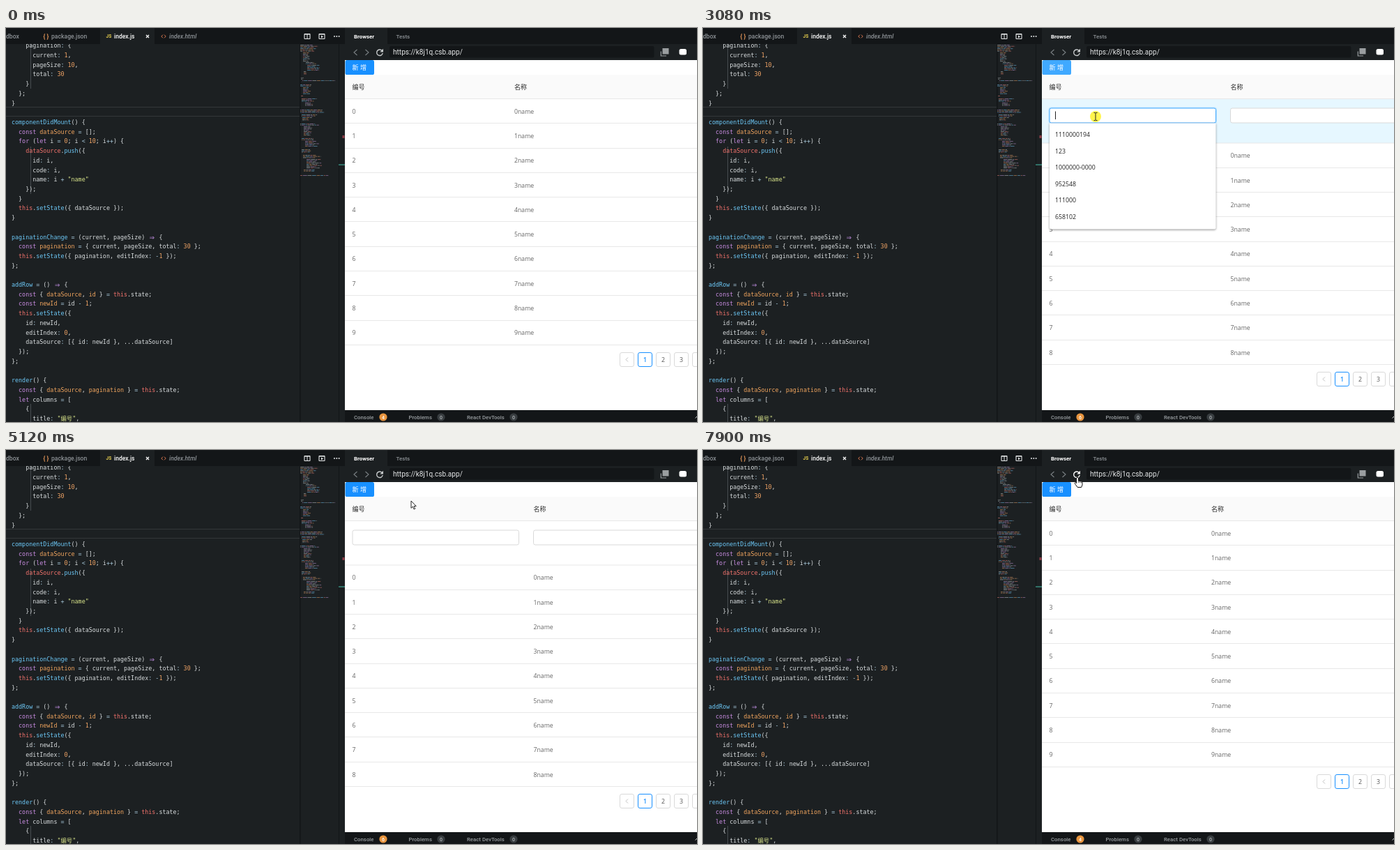
Animation, 991 px wide and 565 px high, one loop 7.99 s. Source, as an HTML page with a canvas:

```html
<!DOCTYPE html>
<html lang="zh">
<head>
<meta charset="utf-8">
<title>Editable table demo</title>
<style>
  html, body { margin: 0; width: 100%; height: 100%; overflow: hidden; background: #1c2022; }
  canvas { display: block; }
</style>
</head>
<body>
<canvas id="stage" width="991" height="565"></canvas>
<script>
const ctx = document.getElementById('stage').getContext('2d');
const LOOP = 7990;
const CJK = '"Noto Sans CJK SC", "Noto Sans CJK JP", sans-serif';
const UI = 'Roboto, ' + CJK, PAGE = '"Open Sans", ' + CJK, MONO = '"DejaVu Sans Mono", "Noto Sans CJK SC", monospace';
const BLUE = '#1890ff', LIGHT_BLUE = '#40a9ff';

// ---------- drawing helpers ----------
function rect(x, y, w, h, color) {
  ctx.fillStyle = color;
  ctx.fillRect(x, y, w, h);
}
function box(x, y, w, h, radius, fill, stroke, lineWidth = 1) {
  ctx.beginPath();
  ctx.roundRect(x, y, w, h, radius);
  if (fill) { ctx.fillStyle = fill; ctx.fill(); }
  if (stroke) { ctx.strokeStyle = stroke; ctx.lineWidth = lineWidth; ctx.stroke(); }
}
function disc(x, y, r, color) {
  ctx.beginPath();
  ctx.arc(x, y, r, 0, Math.PI * 2);
  ctx.fillStyle = color;
  ctx.fill();
}
// y is the middle of the capital letters; returns the advance width
function text(str, x, y, size, color, family = UI, style = '', align = 'left') {
  ctx.font = `${style} ${size}px ${family}`;
  ctx.textAlign = align;
  ctx.fillStyle = color;
  ctx.fillText(str, x, y + size * 0.36);
  return ctx.measureText(str).width;
}
function path(d, x, y, stroke, width = 1, fill) {
  const shape = new Path2D(d);
  ctx.save();
  ctx.translate(x, y);
  if (fill) { ctx.fillStyle = fill; ctx.fill(shape); }
  if (stroke) { ctx.strokeStyle = stroke; ctx.lineWidth = width; ctx.stroke(shape); }
  ctx.restore();
}

// ---------- editor ----------
const CODE = `    pagination: {
      current: 1,
      pageSize: 10,
      total: 30
    }
  };
}

componentDidMount() {
  const dataSource = [];
  for (let i = 0; i < 10; i++) {
    dataSource.push({
      id: i,
      code: i,
      name: i + "name"
    });
  }
  this.setState({ dataSource });
}

paginationChange = (current, pageSize) => {
  const pagination = { current, pageSize, total: 30 };
  this.setState({ pagination, editIndex: -1 });
};

addRow = () => {
  const { dataSource, id } = this.state;
  const newId = id - 1;
  this.setState({
    id: newId,
    editIndex: 0,
    dataSource: [{ id: newId }, ...dataSource]
  });
};

render() {
  const { dataSource, pagination } = this.state;
  let columns = [
    {
      title: "编号",`.split('\n');

const TOKEN = new RegExp([
  '(?<string>"[^"]*")', '(?<arrow>=>)', '(?<keyword>\\b(?:const|let|for)\\b)',
  '(?<self>\\bthis\\b|\\w+(?=\\.push))', '(?<fn>^\\w+|\\w+(?=\\())',
  '(?<number>\\b\\d+)', '(?<declared>(?<=const [^=]*)\\w+)',
  '(?<operator>[=<+:-])', '(?<plain>\\w+|\\s+|.)'
].join('|'), 'g');
const COLORS = {
  string: '#dae58b', arrow: '#c792ea', keyword: '#c78be0', self: '#f0716b', fn: '#6cc7f6',
  number: '#f2a566', declared: '#f0a45e', operator: '#a5c5d8', plain: '#d8dcde'
};

function drawCode() {
  ctx.save();
  ctx.beginPath();
  ctx.rect(0, 23, 421, 542);
  ctx.clip();
  rect(0, 113, 421, 1, '#33383a');
  rect(0, 126, 421, 1, '#33383a');
  for (const [top, bottom] of [[23, 87], [170, 238], [539, 565]])
    rect(35, top, 1, bottom - top, '#464c4f');
  CODE.forEach((line, row) => {
    let x = 8;
    const y = 25.3 + row * 13.71;
    for (const match of line.matchAll(TOKEN)) {
      const kind = Object.keys(COLORS).find(name => match.groups[name] !== undefined);
      if (kind === 'arrow') {
        text('⇒', x + 1.5, y, 12, COLORS.arrow, MONO);
        x += 10.08;
      } else {
        x += text(match[0], x, y, 8.37, COLORS[kind], MONO);
      }
    }
  });
  ctx.restore();
}

// Each block: top, number of lines, indent, longest line
const MINIMAP = [
  [24, 6, 0, 32], [35, 8, 4, 10], [49, 2, 8, 16], [53, 5, 10, 20], [62, 3, 5, 5], [71, 2, 1, 4],
  [75, 1, 3, 47], [81, 2, 0, 24], [85, 6, 4, 12], [97, 1, 1, 3], [101, 3, 2, 22], [107, 3, 7, 12],
  [117, 3, 0, 38], [124, 2, 2, 34], [128, 3, 3, 14], [137, 2, 0, 36], [141, 8, 5, 12],
  [158, 2, 2, 24], [162, 5, 7, 20], [174, 3, 2, 14], [182, 3, 4, 32], [188, 8, 9, 22],
  [203, 2, 5, 24], [211, 1, 0, 41]
];
function drawMinimap() {
  let seed = 7;
  const random = () => (seed = seed * 16807 % 2147483647) / 2147483647;
  const palette = ['#9aa0a3', '#9aa0a3', '#b56863', '#b5835a', '#9a7bab', '#5f9abd'];
  ctx.globalAlpha = 0.75;
  for (const [top, lines, indent, longest] of MINIMAP)
    for (let i = 0; i < lines; i++) {
      const end = 422 + indent + longest * (0.55 + 0.45 * (lines === 1 ? 1 : random()));
      for (let x = 422 + indent; x < end;) {
        const width = Math.min(1 + random() * 5, end - x);
        rect(x, top + i * 1.75, width, 0.9, palette[Math.floor(random() * palette.length)]);
        x += width + 0.8;
      }
    }
  ctx.globalAlpha = 1;
}

function drawEditor() {
  rect(0, 0, 486, 565, '#1c2022');
  drawCode();
  rect(421, 23, 1.5, 542, '#121517');
  drawMinimap();
  rect(477, 23, 1, 542, '#121517');
  rect(482.5, 154, 3, 4, '#8d3d48');
  rect(477, 195.5, 9, 1.2, '#3fa594');

  rect(0, 0, 486, 23, '#131618');
  rect(135, 0, 78, 23, '#1c2022');
  text('dbox', 0, 12, 8.6, '#8d9296', UI, '500');
  text('{ }', 53.5, 11.5, 8.5, '#e8995a', UI, 'bold');
  text('package.json', 65, 12, 8.6, '#8d9296', UI, '500');
  text('JS', 143.5, 12, 6.5, '#e5cd4d', UI, 'bold');
  text('index.js', 155, 12, 8.5, '#fff', UI, '500');
  path('M-2-2L2 2M2-2L-2 2', 203, 12, '#fff', 1.3);
  path('M-1-2.3L-3.2 0L-1 2.3M1-2.3L3.2 0L1 2.3', 226, 12, '#d9774f', 1);
  text('index.html', 234, 12, 8.6, '#8d9296', UI, 'italic 500');
  box(428, 8.5, 8, 7, 0.5, null, '#e4e6e7', 1.1);
  rect(428, 8, 8, 1.6, '#e4e6e7');
  rect(431.5, 8, 1, 8, '#e4e6e7');
  box(449, 8.5, 8, 7, 0.5, null, '#e4e6e7', 1.1);
  rect(449, 8, 8, 1.6, '#e4e6e7');
  path('M-1-2L2 0L-1 2Z', 453, 12.5, null, 0, '#e4e6e7');
  for (const x of [471, 474.3, 477.6]) disc(x, 12, 1, '#e4e6e7');
}

// ---------- browser ----------
function badge(x, count) {
  disc(x, 558, 5.6, count ? '#e8953f' : '#383d40');
  text(count, x, 558, 7, count ? '#fff' : '#b5babd', UI, '500', 'center');
}

function drawBrowserFrame(errors, refreshHovered) {
  rect(486, 0, 505, 23, '#131618');
  rect(486, 0, 61, 23, '#1c2022');
  text('Browser', 499, 12, 7.9, '#fff', UI, 'bold');
  text('Tests', 559.5, 12, 8, '#8d9296', UI, '500');
  rect(486, 23, 505, 23, '#1c2022');
  box(550, 26, 379.5, 16.5, 2, '#131618');
  path('M2.5-4L-2 0L2.5 4', 501, 35, '#7b8084', 1.1);
  path('M-2.5-4L2 0L-2.5 4', 518, 35, '#7b8084', 1.1);
  const refresh = refreshHovered ? '#fff' : '#c9cccd';
  path('M3.2-2.6A4.3 4.3 0 1 0 4.2 1', 536, 35, refresh, 1.4);
  path('M5-5.2V-.5H.3Z', 536, 35, null, 0, refresh);
  text('https://k8j1q.csb.app/', 555, 34.5, 10.1, '#e4e6e7');
  path('M-5.2-1.5V5H2.5', 944.5, 35, '#9a9ea0', 1.2);
  rect(941.5, 29, 9, 8.5, '#9a9ea0');
  box(965.5, 30, 10.5, 8.5, 2.5, '#fff');

  rect(486, 548, 505, 17, '#131618');
  const label = (str, x) => text(str, x, 558, 7.8, '#979c9f', UI, '500');
  label('Console', 499);
  label('Problems', 577.5);
  label('React DevTools', 661);
  badge(541, errors);
  badge(624, 0);
  badge(728, 0);
  path('M-2.5 1.5L0-1L2.5 1.5', 991, 558, '#c9cccd', 1);
}

function drawInput(x, focused) {
  if (focused) box(x - 0.6, 114.4, 239.7, 22.2, 3, null, 'rgba(24,144,255,.2)', 2);
  box(x, 115, 238.5, 21, 2.6, '#fff', focused ? LIGHT_BLUE : '#d9d9d9');
  if (focused) rect(x + 8, 119.5, 1, 11.5, '#222');
}

function drawSuggestions(x, items) {
  ctx.save();
  ctx.shadowColor = 'rgba(0,0,0,.45)';
  ctx.shadowBlur = 3;
  ctx.shadowOffsetY = 1;
  box(x, 136.5, 238.5, 152, [0, 0, 2, 2], '#fff');
  ctx.restore();
  items.forEach((item, i) => text(item, x + 8, 153 + i * 23.55, 8.74, '#222', PAGE));
}

function drawPage(scene, cursor) {
  const { editing, focus } = scene;
  const nameX = editing ? 756.5 : 729;
  const firstTop = editing ? 165 : 101.5;
  const pitch = 35.27;

  box(486.5, 46, 41.5, 21, 2.6, scene.buttonLit ? LIGHT_BLUE : BLUE);
  text('新 增', 496.5, 56.7, 9.1, '#fff', PAGE, '500');
  rect(486, 67, 505, 34, '#fafafa');
  rect(486, 101, 505, 1, '#e8e8e8');
  text('编号', 496.5, 84.3, 9.1, '#2e2e2e', PAGE);
  text('名称', nameX, 84.3, 9.1, '#2e2e2e', PAGE);

  const hovered = (top, height) => cursor && cursor.y >= top && cursor.y < top + height;
  if (editing) {
    if (hovered(102, 63)) rect(486, 102, 505, 63, '#e6f7ff');
    rect(486, 164.5, 505, 1, '#e8e8e8');
    drawInput(497, focus === 1);
    drawInput(756.5, focus === 2);
  }
  const rows = editing ? 9 : 10;
  for (let i = 0; i < rows; i++) {
    const top = firstTop + i * pitch;
    if (hovered(top, pitch)) rect(486, top + 0.5, 505, pitch - 0.5, '#e6f7ff');
    rect(486, Math.round(top + pitch - 0.4), 505, 1, '#e8e8e8');
    text(i, 496.5, top + 18.2, 8.74, '#666', PAGE);
    text(i + 'name', nameX, top + 18.2, 8.74, '#666', PAGE);
  }

  const pagerY = editing ? 493.5 : 465.5;
  ['', 1, 2, 3, 4].forEach((label, i) => {
    const x = 880.5 + i * 26, active = label === 1;
    box(x, pagerY, 20, 20, 2.6, '#fff', active ? BLUE : '#d9d9d9');
    if (label) text(label, x + 10, pagerY + 10.3, 8.74, active ? BLUE : '#555', PAGE, active ? '600' : '', 'center');
    else path('M1.5-3L-1.5 0L1.5 3', x + 10, pagerY + 10, '#b8b8b8', 0.9);
  });

  if (focus === 1) drawSuggestions(497, ['1110000194', '123', '1000000-0000', '952548', '111000', '658102']);
  if (focus === 2) drawSuggestions(756.5, ['123', 'QWLTB系列2', '888', '林若川', 'name', 'velmit']);
}

// ---------- pointer ----------
const POINTER = [
  [70, 940, 550], [820, 523, 68], [1120, 515, 58], [2450, 515, 58], [2930, 563, 127],
  [3560, 563, 127], [3950, 826, 117], [4430, 826, 117], [4900, 581, 73], [5130, 581, 73],
  [5250, 563, 71], [5800, 537, 39]
];
const CLICKS = [1820, 3080, 4020, 4950, 5870];
const CLICK_TIME = 150;

function pointerAt(t) {
  if (t < POINTER[0][0]) return null;
  const next = POINTER.findIndex(key => key[0] > t);
  if (next < 0) return { x: 537, y: 39 };
  const [t0, x0, y0] = POINTER[next - 1], [t1, x1, y1] = POINTER[next];
  const p = (t - t0) / (t1 - t0), eased = p * p * (3 - 2 * p);
  return { x: x0 + (x1 - x0) * eased, y: y0 + (y1 - y0) * eased };
}

const inside = (p, x, y, w, h) => p && p.x >= x && p.x < x + w && p.y >= y && p.y < y + h;
const overButton = p => inside(p, 486, 46, 42, 21);
const overRefresh = p => inside(p, 528, 26, 18, 18);

function drawPointer(p, t, editing) {
  if (CLICKS.some(start => t >= start && t < start + CLICK_TIME))
    disc(p.x, p.y, 8, 'rgba(255,240,0,.7)');
  const overInput = editing && (inside(p, 497, 115, 239, 21) || inside(p, 756, 115, 235, 21));
  if (overButton(p) || overRefresh(p)) {
    path('M-1.4 1Q0-1 1.4 1V5L5.6 6Q7 6.4 7 8V11L5.6 14.5H.2L-3.6 9.4Q-4.2 7.6-2.6 7.6L-1.4 8.8Z', p.x, p.y, '#111', 1, '#fff');
    path('M1.4 5V8M3.4 5.7V8M5.3 6.2V8.4', p.x, p.y, '#111', 0.7);
  } else if (overInput) {
    path('M-2.5-5.5H-.8L0-4.8L.8-5.5H2.5M0-4.8V4.8M-2.5 5.5H-.8L0 4.8L.8 5.5H2.5', p.x, p.y, '#222', 1);
  } else {
    path('M0 0V10.3L2.4 8.1L4.1 12L5.8 11.2L4.1 7.5H7.2Z', p.x, p.y, '#111', 0.9, '#fff');
  }
}

// ---------- timeline ----------
const between = (t, start, end) => t >= start && t < end;

function render(t) {
  const pointer = pointerAt(t);
  const scene = {
    loaded: !between(t, 6420, 7670),
    editing: between(t, 2050, 6420),
    focus: between(t, 3080, 4020) ? 1 : between(t, 4020, 4950) ? 2 : 0,
    buttonLit: overButton(pointer) || between(t, 1820, 3160)
  };
  const errors = between(t, 2140, 6570) ? 6 : between(t, 6570, 7820) ? 0 : 4;

  drawEditor();
  rect(486, 46, 505, 502, '#fff');
  if (scene.loaded) drawPage(scene, pointer);
  drawBrowserFrame(errors, overRefresh(pointer));
  if (pointer) drawPointer(pointer, t, scene.editing);
}

const startTime = performance.now();
function tick() {
  render((performance.now() - startTime) % LOOP);
  requestAnimationFrame(tick);
}
tick();
</script>
</body>
</html>
```
